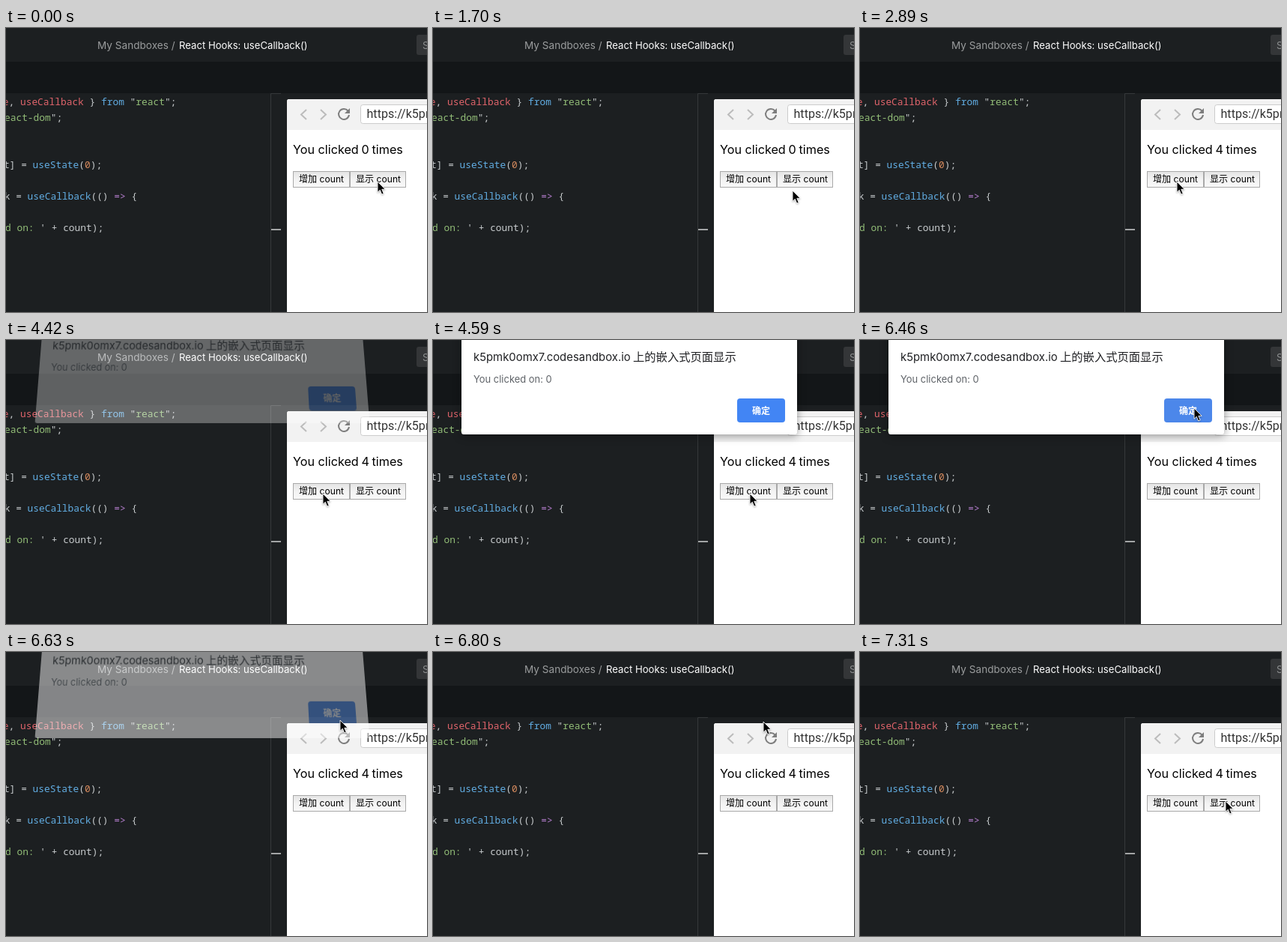
An HTML page that plays this animation: 562x379 px, repeating every 7480 ms.

```html
<!DOCTYPE html>
<html lang="zh-CN">
<head>
<meta charset="utf-8">
<title>useCallback demo</title>
<style>
  html, body { margin: 0; width: 100%; height: 100%; overflow: hidden; background: #1c1f21; }
  svg { position: absolute; left: 0; top: 0; width: 562px; height: 379px; }
  text { font-family: Inter, "Noto Sans CJK SC", "Noto Sans CJK", sans-serif; white-space: pre; }
  .code text { font: 12.87px "Noto Sans Mono", monospace; fill: #c8ccce; }
  .red { fill: #e0646b; }
  .blue { fill: #62aee4; }
  .green { fill: #92bd77; }
  .orange { fill: #d58a5e; }
  .purple { fill: #b77fd0; }
  .button rect { fill: url(#face); stroke: #a9a9a9; }
  .button text { font-size: 12.1px; }
  #dialog { transform-origin: 262px 0; }
  #panel { filter: drop-shadow(0 2px 6px rgba(0, 0, 0, .4)); }
  #cursor { filter: drop-shadow(0 1px 1px rgba(0, 0, 0, .3)); }
</style>
</head>
<body>
<svg viewBox="0 0 562 379">
  <defs>
    <linearGradient id="face" x2="0" y2="1">
      <stop stop-color="#e4e4e4"/><stop offset=".5" stop-color="#f3f3f3"/><stop offset="1" stop-color="#f8f8f8"/>
    </linearGradient>
  </defs>

  <!-- Editor -->
  <rect width="562" height="379" fill="#1c1f21"/>
  <rect y="45" width="562" height="42" fill="#131618"/>
  <text x="122" y="28" font-size="13.6" fill="#9a9c9d">My Sandboxes /</text>
  <text x="231" y="28" font-size="13.15" fill="#fff">React Hooks: useCallback()</text>
  <rect x="548" y="9" width="30" height="27" rx="3" fill="#343638"/>
  <text x="556" y="28" font-size="13" fill="#8b8d8e">S</text>
  <g class="code">
    <text x="-4.2" y="103"><tspan class="red">e</tspan>, <tspan class="red">useCallback</tspan> } <tspan class="blue">from</tspan> "<tspan class="green">react</tspan>";</text>
    <text x="-2" y="124"><tspan class="green">eact-dom</tspan>";</text>
    <text x="-3" y="187">t] = <tspan class="blue">useState</tspan>(<tspan class="orange">0</tspan>);</text>
    <text x="-2.3" y="229">k = <tspan class="blue">useCallback</tspan>(() <tspan class="purple">=&gt;</tspan> {</text>
    <text x="-1" y="271"><tspan class="green">d on: </tspan>' + count);</text>
  </g>
  <path d="M367 87.5H353.5V379" fill="none" stroke="#35383a"/>
  <rect x="354" y="268" width="13" height="2" fill="#a3a5a6"/>

  <!-- Preview -->
  <path d="M375 379V98q0-3 3-3H562V379Z" fill="#fff"/>
  <path d="M375 136V98q0-3 3-3H562V136Z" fill="#f2f2f2"/>
  <g fill="none" stroke-width="2">
    <path d="M401 109l-7 6.5 7 6.5M420 109l7 6.5-7 6.5" stroke="#bcbcbc"/>
    <path d="M456.5 110.5A7 7 0 1 0 458 116" stroke="#7d7d7d"/>
  </g>
  <path d="M459 107v7h-7Z" fill="#7d7d7d"/>
  <rect x="473.5" y="102.5" width="110" height="25" rx="3" fill="#fff" stroke="#ccc"/>
  <text x="481.5" y="120" font-size="16.1" fill="#333" style="font-family:Roboto,sans-serif">https://k5pmk0omx7</text>
  <g font-size="16.2">
    <text x="383" y="168">You clicked</text>
    <text id="count" x="474.5" y="168"></text>
    <text id="times" y="168">times</text>
  </g>
  <g class="button">
    <rect x="383.5" y="191.5" width="75" height="21"/><text x="391" y="206">增加 count</text>
    <rect x="459.5" y="191.5" width="74" height="21"/><text x="467" y="206">显示 count</text>
  </g>
</svg>

<svg id="dialog" viewBox="0 0 562 379">
  <rect id="panel" x="38" y="-30" width="448" height="156" rx="3" fill="#fff"/>
  <text x="54" y="28" font-size="14.9" fill="#202124">k5pmk0omx7.codesandbox.io</text>
  <text x="267" y="28" font-size="15.3" fill="#202124">上的嵌入式页面显示</text>
  <text x="54" y="57" font-size="12.95" fill="#5f6368">You clicked on: 0</text>
  <rect id="confirm" x="406" y="78" width="64" height="32" rx="4"/>
  <text x="438" y="98.5" font-size="12" font-weight="700" fill="#fff" text-anchor="middle">确定</text>
</svg>

<svg viewBox="0 0 562 379">
  <path id="cursor" d="M0 0V14.3L3.3 11.2 5.7 17 8.2 16 5.8 10.3H10.2Z" stroke="#fff" stroke-width=".9"/>
</svg>

<script>
const LOOP = 7480;
const $ = id => document.getElementById(id);

// Each step holds from its start time: [ms, ...values]
const cursorSteps = [
  [0, 496, 205], [1700, 480, 217], [1870, 427, 209], [2040, 423, 205],
  [5270, 438, 87], [5440, 438, 70], [5610, 444, 80], [5780, 446, 89], [5950, 446, 91],
  [6800, 441, 93], [6970, 455, 158], [7140, 482, 191], [7310, 488, 199]
];
const countSteps = [[0, 0], [2380, 1], [2550, 2], [2720, 3], [2890, 4]];
// Dialog: state, vertical shift, brightness
const dialogSteps = [
  [0, "hidden"], [4420, "tilted", -15, .32], [4590, "open"],
  [6630, "tilted", -11, .48], [6800, "hidden"]
];

const at = (steps, t) => steps.findLast(([start]) => start <= t).slice(1);

function draw(t) {
  const [x, y] = at(cursorSteps, t);
  $("cursor").setAttribute("transform", `translate(${x} ${y})`);

  const [count] = at(countSteps, t);
  $("count").textContent = count;
  $("times").setAttribute("x", count === 1 ? 484.5 : 488.5);

  // While tilted, the dialog only brightens the page beneath it
  const [state, shift, brightness] = at(dialogSteps, t);
  const tilted = state === "tilted";
  const style = $("dialog").style;
  style.visibility = state === "hidden" ? "hidden" : "visible";
  style.mixBlendMode = tilted ? "screen" : "normal";
  style.filter = tilted ? `brightness(${brightness})` : "none";
  style.transform = tilted
    ? `matrix3d(1,0,0,0, 0,1.002,0,-.000378, 0,0,1,0, 0,${shift},0,1.05)` : "none";
  $("panel").style.filter = tilted ? "none" : "";
  $("confirm").setAttribute("fill", t >= 5780 ? "#4c87ea" : "#4285f4");
}

function tick() {
  draw(performance.now() % LOOP);
  requestAnimationFrame(tick);
}
tick();
</script>
</body>
</html>
```
